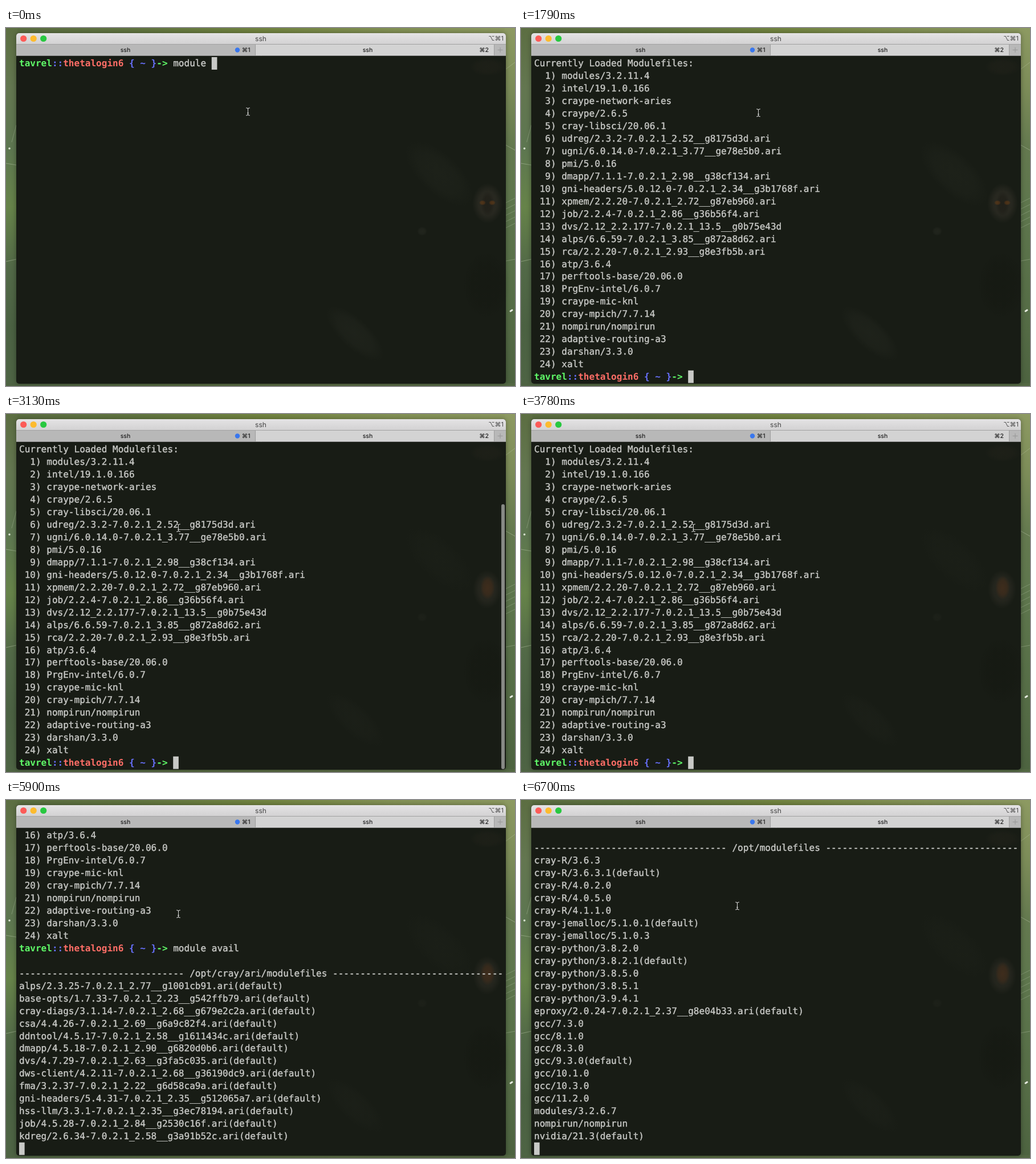
An HTML page with a canvas for the animation above (8 s loop, 893 by 627 pixels).

```html
<!DOCTYPE html>
<html lang="en">
<head>
<meta charset="utf-8">
<title>Terminal session</title>
<style>
  html, body { margin: 0; width: 100%; height: 100%; overflow: hidden; background: #5b7048; }
  canvas { display: block; }
</style>
</head>
<body>
<canvas id="stage" width="893" height="627"></canvas>
<script>
const W = 893, H = 627, LOOP = 8000;
const ctx = document.getElementById('stage').getContext('2d');
const MONO = '16.03px "DejaVu Sans Mono", monospace';
const CELL = 9.65, LINE = 21.95, LEFT = 23, TOP = 51, BASELINE = 16.3, ROWS = 26, COLS = 88;
const GREY = '#c8c9c6', GREEN = '#5ffa68', RED = '#ff6e67', BLUE = '#6871ff';
const PROMPT = [['tavrel', GREEN], ['::', BLUE], ['thetalogin6', RED], [' { ~ }', BLUE], ['->', GREEN]];
const PROMPT_COLS = 28;

// ---- terminal contents; a leading "$" marks a prompt line ----
let seed = 7;
const rand = n => (seed = (seed * 16807) % 2147483647) % n;

const rule = path => {
  const n = COLS - path.length - 2, left = n >> 1;
  return '-'.repeat(left) + ' ' + path + ' ' + '-'.repeat(n - left);
};
const columns = (items, rows, width) => Array.from({ length: rows }, (_, r) =>
  items.filter((_, i) => i % rows === r).map(s => s.padEnd(width)).join('').trimEnd());
const ariModule = name => {
  const hash = (0x10000000 + rand(0x6fffffff)).toString(16);
  return `${name}/${1 + rand(6)}.${rand(9)}.${rand(40)}-7.0.2.1_2.${20 + rand(79)}__g${hash}.ari(default)`;
};
const section = (path, lines) => ['', rule(path), ...lines];

const loaded = `modules/3.2.11.4 intel/19.1.0.166 craype-network-aries craype/2.6.5 cray-libsci/20.06.1
udreg/2.3.2-7.0.2.1_2.52__g8175d3d.ari ugni/6.0.14.0-7.0.2.1_3.77__ge78e5b0.ari pmi/5.0.16
dmapp/7.1.1-7.0.2.1_2.98__g38cf134.ari gni-headers/5.0.12.0-7.0.2.1_2.34__g3b1768f.ari
xpmem/2.2.20-7.0.2.1_2.72__g87eb960.ari job/2.2.4-7.0.2.1_2.86__g36b56f4.ari
dvs/2.12_2.2.177-7.0.2.1_13.5__g0b75e43d alps/6.6.59-7.0.2.1_3.85__g872a8d62.ari
rca/2.2.20-7.0.2.1_2.93__g8e3fb5b.ari atp/3.6.4 perftools-base/20.06.0 PrgEnv-intel/6.0.7
craype-mic-knl cray-mpich/7.7.14 nompirun/nompirun adaptive-routing-a3 darshan/3.3.0 xalt`.split(/\s+/);

const targets = `accel-host accel-nvidia20 accel-nvidia35 accel-nvidia52 accel-nvidia60 broadwell haswell
hugepages1G hugepages2G hugepages2M hugepages4M hugepages8M hugepages16M hugepages32M hugepages64M
hugepages128M hugepages256M hugepages512M intel-knc ivybridge mic-knl network-aries network-none
sandybridge x86-cascadelake x86-skylake`.split(/\s+/).map(s => 'craype-' + s);

const ari = `alps base-opts cray-diags csa ddntool dmapp dvs dws-client fma gni-headers hss-llm job
kdreg krca lib-utils llm logcb nodehealth nodestat pmi-lib rca rsipd sdb switch sysadm
udreg ugni`.split(/\s+/).map(ariModule);

const peModules = `atp/3.6.4(default) cce/9.1.3 cce/10.0.1(default) cray-ccdb/3.0.5 cray-cti/1.0.9
cray-fftw/3.3.8.7(default) cray-ga/5.3.0.10(default) cray-hdf5/1.10.6.1 cray-hdf5/1.12.0.0(default)
cray-hdf5-parallel/1.12.0.0(default) cray-libsci/20.06.1(default) cray-mpich/7.7.14(default)
cray-mpich-abi/7.7.14(default) cray-netcdf/4.7.4.0(default) cray-openshmemx/9.1.1
cray-parallel-netcdf/1.12.1.0(default) cray-petsc/3.13.3.0(default) cray-shmem/7.7.14
cray-tpsl/20.03.2(default) cray-trilinos/12.18.1.1(default) craype/2.6.5(default)
gdb4hpc/4.7.4 iobuf/2.0.10(default) papi/6.0.0.1(default) perftools perftools-base/20.06.0(default)
perftools-lite pmi/5.0.16(default) stat/4.5.1 valgrind4hpc/2.7.2`.split(/\s+/);

const optModules = `cray-R/3.6.3 cray-R/3.6.3.1(default) cray-R/4.0.2.0 cray-R/4.0.5.0 cray-R/4.1.1.0
cray-jemalloc/5.1.0.1(default) cray-jemalloc/5.1.0.3 cray-python/3.8.2.0 cray-python/3.8.2.1(default)
cray-python/3.8.5.0 cray-python/3.8.5.1 cray-python/3.9.4.1
eproxy/2.0.24-7.0.2.1_2.37__g8e04b33.ari(default) gcc/7.3.0 gcc/8.1.0 gcc/8.3.0 gcc/9.3.0(default)
gcc/10.1.0 gcc/10.3.0 gcc/11.2.0 modules/3.2.6.7 nompirun/nompirun nvidia/21.3(default)`.split(/\s+/);

const doc = ['$clear', '$module list', 'Currently Loaded Modulefiles:',
  ...loaded.map((s, i) => String(i + 1).padStart(3) + ') ' + s)];
const listEnd = doc.length;
doc.push('$module avail', ...section('/opt/cray/ari/modulefiles', [...ari,
  'wlm_trans/1.5.6-7.0.2.1_2.93__gad40448.ari(default)',
  'xpmem/2.2.20-7.0.2.1_2.72__g87eb960.ari(default)',
  'xtgetconfig/2.3.90-7.0.2.1_2.22__g3d11e7d.ari(default)']));
const ariEnd = doc.length;
doc.push(...section('/opt/cray/pe/craype/2.6.5/modulefiles', columns(targets, 9, 23)),
  ...section('/opt/cray/pe/craype-targets/default/modulefiles',
    columns(targets.filter(s => !s.endsWith('nvidia20')), 9, 23)));
const targetEnd = doc.length;
doc.push(...section('/opt/cray/pe/modulefiles', peModules));
const peEnd = doc.length;
doc.push(...section('/opt/modulefiles', optModules));
const pages = [listEnd + 16, ariEnd, targetEnd, peEnd, doc.length];

// ---- timing ----
// Number of equal steps taken by time t when the first is at a and the n-th at b.
const steps = (t, a, b, n) =>
  t < a ? 0 : Math.min(n, 1 + Math.floor((t - a) * (n - 1) / (b - a) + 0.01));

function screen(t) {
  if (t < 1250) return { top: 1, end: 1, tail: '$module ' + 'list'.slice(0, steps(t, 720, 890, 4)) };
  const page = steps(t, 5900, 6120, 5);
  if (page) return { top: pages[page - 1] - ROWS + 1, end: pages[page - 1], tail: '' };
  const up = scrolled(t);
  const middle = [0, 1, 2, 4][steps(t, 4500, 4670, 3)];
  const typed = (t >= 4320 ? 2 : 0) + middle + (t >= 4840 ? 1 : 0) + steps(t, 4960, 5360, 5);
  return { top: 2 - up, end: listEnd, tail: '$' + 'module avail'.slice(0, typed) };
}
const scrolled = t => steps(t, 2610, 2720, 2) - steps(t, 3070, 3130, 2);

function pointer(t) {
  const a = (steps(t, 1790, 2190, 8) / 8) ** 1.3;
  const b = steps(t, 6480, 6700, 5) / 5;
  const ease = b * b * (3 - 2 * b);
  return [424 - 122 * a + 77 * ease, 146 + 52.5 * a ** 1.3 - 13.5 * ease];
}

// ---- drawing helpers ----
function box(x, y, w, h, fill, r = 0) {
  ctx.fillStyle = fill;
  ctx.beginPath();
  ctx.roundRect(x, y, w, h, r);
  ctx.fill();
}
function dot(x, y, r, fill) {
  ctx.fillStyle = fill;
  ctx.beginPath();
  ctx.arc(x, y, r, 0, 7);
  ctx.fill();
}
function line(color, width, ...pts) {
  ctx.strokeStyle = color;
  ctx.lineWidth = width;
  ctx.beginPath();
  for (let i = 0; i < pts.length; i += 2) ctx.lineTo(pts[i], pts[i + 1]);
  ctx.stroke();
}
function fade(x0, y0, x1, y1, ...colors) {
  const g = ctx.createLinearGradient(x0, y0, x1, y1);
  colors.forEach((c, i) => g.addColorStop(i / (colors.length - 1), c));
  return g;
}
function glow(x, y, rx, ry, rgb, alpha, angle = 0) {
  ctx.save();
  ctx.translate(x, y);
  ctx.rotate(angle);
  ctx.scale(rx, ry);
  const g = ctx.createRadialGradient(0, 0, 0, 0, 0, 1);
  g.addColorStop(0, `rgba(${rgb},${alpha})`);
  g.addColorStop(0.6, `rgba(${rgb},${alpha * 0.75})`);
  g.addColorStop(1, `rgba(${rgb},0)`);
  dot(0, 0, 1, g);
  ctx.restore();
}
function label(text, x, y, size, color, align = 'center', weight = 400) {
  ctx.font = `${weight} ${size}px Inter, "DejaVu Sans", sans-serif`;
  ctx.textAlign = align;
  ctx.textBaseline = 'middle';
  ctx.fillStyle = color;
  ctx.fillText(text, x, y);
}

function desktop() {
  box(0, 0, W, H, fade(0, 0, W, 0, '#596c40', '#60743f', '#71833f', '#829054', '#8b985f'));
  box(0, 0, 20, H, fade(0, 0, 0, H, '#5c6e42', '#637650', '#5d7650', '#668349', '#526947', '#4b6142', '#4e6444'));
  box(875, 0, 18, H, fade(0, 0, 0, H, '#8d9a62', '#7c8c58', '#64794f', '#5e764d', '#597149', '#546b45', '#4d6340'));
  box(0, 622, W, 5, fade(0, 0, W, 0, '#4e6343', '#55693f', '#5a6b45', '#536843'));
  const web = 'rgba(205,218,190,.4)';
  line(web, 1, 0, 237, 18, 240);
  line(web, 1, 0, 409, 18, 405);
  line(web, 0.8, 10, 200, 18, 170);
  line(web, 1, 877, 205, 893, 214);
  line(web, 0.8, 877, 72, 893, 60);
  line(web, 0.8, 877, 408, 893, 405);
  for (let y = 300; y < 355; y += 11) line(web, 0.7, 877, y + 6, 893, y - 2);
  dot(6, 211, 1.8, '#dde6d4');
  ctx.lineCap = 'round';
  line('#e6ebe0', 3, 885, 496, 888, 494);
  ctx.lineCap = 'butt';
}

function chrome() {
  ctx.save();
  ctx.shadowColor = 'rgba(0,0,0,.35)';
  ctx.shadowBlur = 8;
  box(18, 9, 859, 614, '#181c15', 5);
  ctx.restore();
  box(18, 9, 859, 20, fade(0, 9, 0, 29, '#e4e3e4', '#d2d1d2'), [5, 5, 0, 0]);
  box(18, 28, 859, 21, '#b8b8b8');
  box(438, 29, 418, 20, '#d3d3d3');
  line('#a2a2a2', 1, 18, 28.5, 877, 28.5);
  line('#9d9d9d', 1, 437.5, 29, 437.5, 49);
  line('#9d9d9d', 1, 856.5, 29, 856.5, 49);
  line('#8f8f8f', 1, 18, 48.5, 877, 48.5);
  ['#fc5b57', '#fdbb2e', '#28c840'].forEach((c, i) => dot(30.7 + i * 17.5, 18.5, 5.6, c));
  label('ssh', 447, 19, 12, '#454545');
  label('⌥⌘1', 873, 18.5, 11, '#484848', 'right');
  label('ssh', 209.5, 39, 10.5, '#1c1c1c', 'center', 500);
  label('ssh', 634.5, 39, 10.5, '#1c1c1c', 'center', 500);
  label('⌘1', 428.5, 39, 10.5, '#1c1c1c', 'right', 500);
  label('⌘2', 847, 39, 10.5, '#1c1c1c', 'right', 500);
  line('#969696', 1, 862.5, 38.5, 871.5, 38.5);
  line('#969696', 1, 867, 34, 867, 43);
  dot(406, 38.5, 4.2, '#3977ee');
}

// Dim shapes showing through the translucent window.
function backdrop(late) {
  const k = late ? 0.5 : 1;
  glow(760, 255, 75, 35, '60,64,52', 0.14 * k, 0.75);
  glow(612, 535, 65, 26, '70,72,62', 0.14 * k, 0.75);
  glow(845, 68, 32, 16, '62,52,40', 0.15);
  glow(730, 356, 9, 8, '70,72,62', 0.2 * k);
  glow(842, 450, 42, 60, '10,12,6', 0.15);
  if (late) {
    glow(844, 307, 25, 34, '66,60,51', 0.38);
    glow(845, 304, 13, 21, '110,54,20', 0.32);
  } else {
    glow(845, 307, 27, 35, '66,60,51', 0.48);
    glow(845, 308, 12, 22, '26,25,19', 0.6);
    glow(836, 306, 6, 4.5, '125,68,20', 0.5);
    glow(853, 306, 6, 4.5, '125,68,20', 0.5);
  }
}

// Regular text gets a hairline outline for the heavier screen rendering.
function cells(text, col, row, color, bold) {
  ctx.font = (bold ? 'bold ' : '') + MONO;
  ctx.fillStyle = ctx.strokeStyle = color;
  ctx.lineWidth = 0.4;
  const y = TOP + BASELINE + row * LINE;
  [...text].forEach((c, i) => {
    if (c === ' ') return;
    const x = LEFT + (col + i) * CELL;
    ctx.fillText(c, x, y);
    if (!bold) ctx.strokeText(c, x, y);
  });
}
// Draws one terminal line and returns the column after it.
function row(text, r) {
  if (text[0] !== '$') {
    cells(text, 0, r, GREY);
    return text.length;
  }
  let col = 0;
  for (const [part, color] of PROMPT) {
    cells(part, col, r, color, true);
    col += part.length;
  }
  cells(text.slice(1), PROMPT_COLS, r, GREY);
  return PROMPT_COLS + text.length - 1;
}

function terminal(t) {
  const { top, end, tail } = screen(t);
  ctx.textAlign = 'left';
  ctx.textBaseline = 'alphabetic';
  doc.slice(top, Math.min(end, top + ROWS)).forEach(row);
  const last = end - top;
  if (last >= ROWS) return;
  const col = row(tail, last);
  box(LEFT + col * CELL, TOP + last * LINE, CELL, LINE, GREY);
}

function scrollbar(t) {
  const alpha = steps(t, 2370, 2430, 2) / 2 - steps(t, 3600, 3780, 4) / 4;
  if (alpha <= 0) return;
  box(869, 158 - 18 * scrolled(t), 6, 464, `rgba(148,149,146,${alpha * 0.9})`, 3);
}

function ibeam(x, y) {
  ctx.save();
  ctx.translate(Math.round(x) + 0.5, Math.round(y) + 0.5);
  for (const [color, width] of [['rgba(0,0,0,.6)', 2.6], ['#d8dad5', 1.1]]) {
    line(color, width, -3.5, -6.5, -1.5, -6.5, 0, -5, 0, 5, -1.5, 6.5, -3.5, 6.5);
    line(color, width, 3.5, -6.5, 1.5, -6.5, 0, -5);
    line(color, width, 3.5, 6.5, 1.5, 6.5, 0, 5);
    line(color, width, -1.5, 2.5, 1.5, 2.5);
  }
  ctx.restore();
}

function draw(now) {
  const t = now % LOOP;
  desktop();
  chrome();
  backdrop(t >= 2610);
  terminal(t);
  scrollbar(t);
  ibeam(...pointer(t));
}

ctx.textRendering = 'geometricPrecision';
const start = performance.now();
function tick() {
  draw(performance.now() - start);
  requestAnimationFrame(tick);
}
tick();
</script>
</body>
</html>
```
